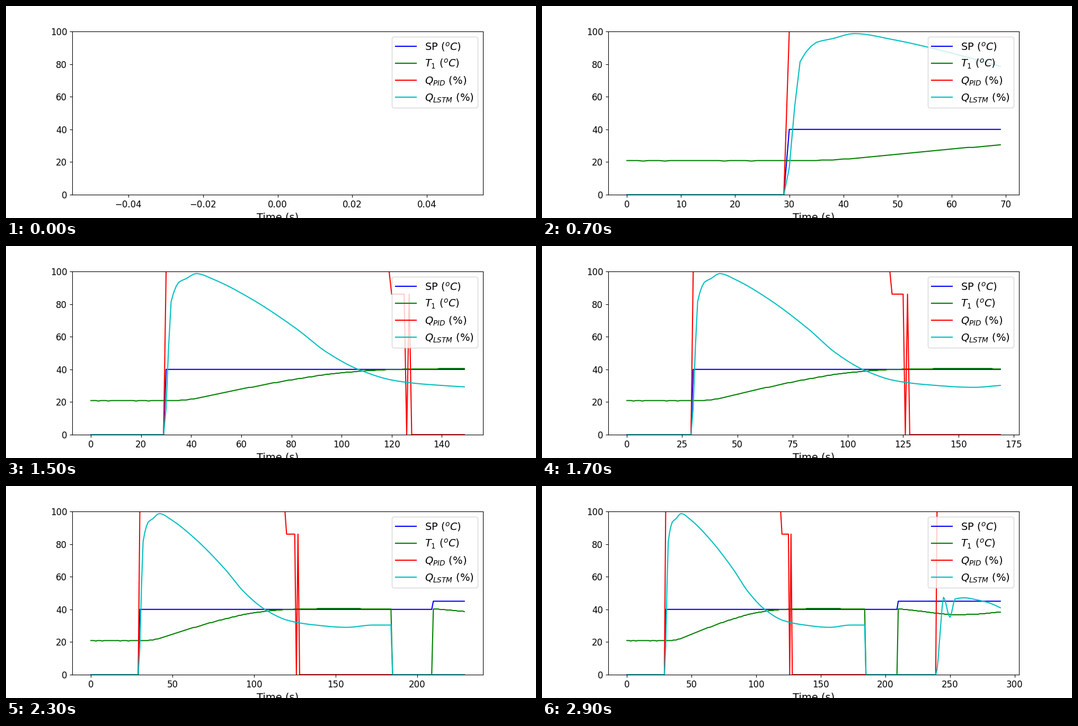
Write a matplotlib script that moves like this. It is 1000 px wide and 400 px high and loops after 3000 ms.

```python
import numpy as np
import matplotlib.pyplot as plt
from matplotlib.animation import FuncAnimation

FRAMES, STEP = 30, 10
QUANTUM, T_BASE = 0.3223, 20.58   # sensor resolution and lowest reading

# Phases of the run, in seconds
HEAT_ON, DROPOUT, NEW_SETPOINT, RESTART = 30, 185, 210, 240

plt.rcParams.update({
    "font.family": "DejaVu Sans",
    "xtick.labelsize": 12,
    "ytick.labelsize": 12,
    "axes.labelsize": 14,
    "legend.fontsize": 14,
})

time = np.arange(FRAMES * STEP)


def between(start, stop):
    return (time >= start) & (time < stop)


def smooth(*points):
    """Cubic curve through key points that never overshoots them."""
    t, v = np.array(points, float).T
    step = np.diff(t)
    slope = np.diff(v) / step
    a, b = slope[:-1], slope[1:]
    same_sign = a * b > 0
    inner = np.where(same_sign, 2 * a * b / np.where(same_sign, a + b, 1), 0)
    tangent = np.r_[slope[0], inner, slope[-1]]

    x = np.clip(time, t[0], t[-1])
    i = np.clip(np.searchsorted(t, x, side="right") - 1, 0, len(step) - 1)
    h, u = step[i], (x - t[i]) / step[i]
    ease = u * u * (3 - 2 * u)
    return (v[i] + (v[i + 1] - v[i]) * ease
            + h * u * (1 - u) * (tangent[i] * (1 - u) - tangent[i + 1] * u))


def make_setpoint():
    return np.select([time < HEAT_ON, time < NEW_SETPOINT], [0.0, 40.0], 45.0)


def make_pid():
    pid = np.zeros(time.size)
    pid[between(HEAT_ON, 120) | (time >= RESTART)] = 100
    pid[between(120, 126) | (time == 127)] = 86.1
    return pid


def make_temperature():
    heating = smooth((33, 20.9), (38, 21.3), (42, 22.3), (63, 28.8),
                     (80, 33.6), (100, 37.9), (120, 39.9), (140, 40.42),
                     (150, 40.5), (163, 40.42), (184, 40.25))
    cooling = smooth((210, 40.3), (215, 39.95), (229, 38.7), (239, 37.7),
                     (255, 36.75), (268, 37.0), (289, 38.4))
    temp = np.where(time < NEW_SETPOINT, heating, cooling)
    flicker = np.random.default_rng(4).random(time.size) < 0.2
    temp[flicker & (time < 33)] = T_BASE
    temp = T_BASE + QUANTUM * np.round((temp - T_BASE) / QUANTUM)
    temp[between(DROPOUT, NEW_SETPOINT)] = 0
    return temp


def make_lstm():
    first = smooth((29, 0), (30, 16.5), (31, 54), (32, 81.5), (33, 87),
                   (35, 93.3), (38, 95.6), (42, 98.7), (49, 95.1),
                   (64, 83.2), (82, 64.9), (94, 50.6), (107, 39.8),
                   (121, 33.2), (135, 30.7), (157, 29), (173, 30.4),
                   (184, 30.4))
    second = smooth((239, 0), (240, 3), (243, 32), (245, 47.4), (250, 35.2),
                    (254, 46.4), (261, 47.1), (270, 46), (281, 43.8),
                    (289, 41))
    lstm = np.where(time < RESTART, first, second)
    lstm[between(DROPOUT, RESTART)] = 0
    return lstm


SERIES = [
    (make_setpoint(), "b", r"SP $(^oC)$"),
    (make_temperature(), "g", r"$T_1$ $(^oC)$"),
    (make_pid(), "r", r"$Q_{PID}$ (%)"),
    (make_lstm(), "c", r"$Q_{LSTM}$ (%)"),
]

fig, ax = plt.subplots(figsize=(10, 4), dpi=100)


def draw(frame):
    n = frame * STEP
    ax.clear()
    for values, color, label in SERIES:
        ax.plot(time[:n], values[:n], color=color, label=label)
    ax.set_ylim(0, 100)
    ax.set_xlabel("Time (s)")
    ax.legend(loc="upper right")


anim = FuncAnimation(fig, draw, frames=FRAMES, interval=100, repeat=True,
                     repeat_delay=0)
plt.show()
```
